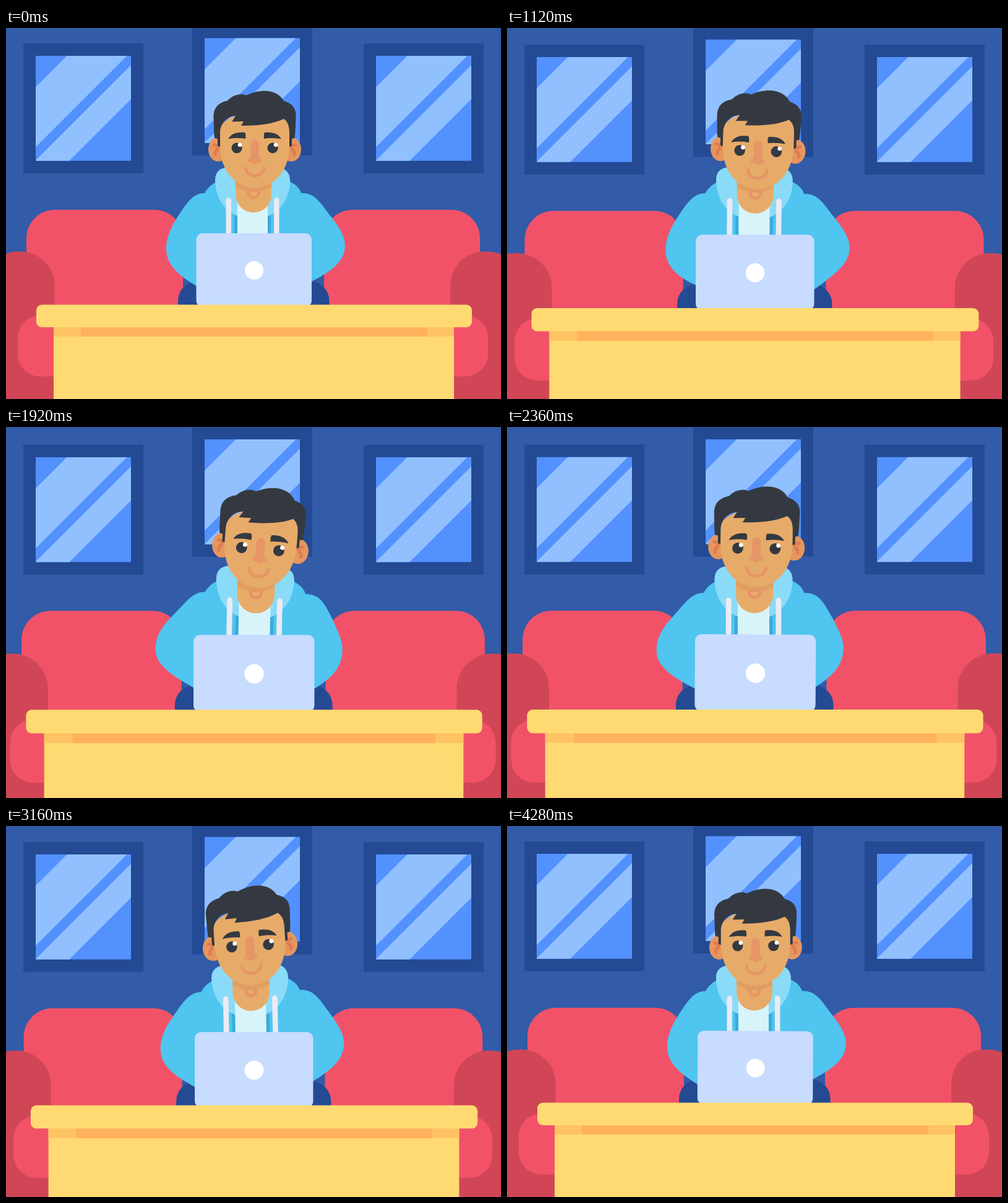
Write an HTML page with a canvas that moves like this. It is 800 px wide and 600 px high and loops after 4.32 s.

```html
<!DOCTYPE html>
<html lang="en">
<head>
<meta charset="utf-8">
<title>Working from the sofa</title>
<style>
  html, body { margin: 0; width: 100%; height: 100%; overflow: hidden; background: #325ba8; }
  canvas { display: block; }
</style>
</head>
<body>
<canvas id="stage" width="800" height="600"></canvas>
<script>
const ctx = document.getElementById('stage').getContext('2d');
const LOOP = 4320, CX = 401, CY = 322;
const C = {
  wall: '#325ba8', navy: '#244a94', glass: '#5391ff', shine: '#91c0ff',
  sofa: '#f25268', sofaDark: '#d04657',
  desk: '#ffda72', deskEdge: '#ffc364', deskShade: '#ffb15d',
  hoodie: '#4fc5f0', hood: '#8adbf8', zip: '#38abdb', shirt: '#d7f4fb', string: '#ebeaf3',
  skin: '#e7ab69', shade: '#e19e62', blush: '#e69566', ear: '#e6965d', earDark: '#de7c52',
  hair: '#343941', laptop: '#c7dcff'
};

// Smooth periodic curves through a few poses.
const TIMES = [0, 640, 1120, 1920, 2720, 3600];
function curve(...v) {
  const n = v.length;
  const time = i => TIMES[(i + n) % n] + LOOP * Math.floor(i / n);
  const val = i => v[(i + n) % n];
  const slope = i => (val(i + 1) - val(i - 1)) / (time(i + 1) - time(i - 1));
  return t => {
    let i = n - 1;
    while (TIMES[i] > t) i--;
    const d = time(i + 1) - time(i), u = (t - time(i)) / d, w = 1 - u;
    return val(i) * (1 + 2 * u) * w * w + val(i + 1) * (3 - 2 * u) * u * u
      + d * u * w * (slope(i) * w - slope(i + 1) * u);
  };
}
const pose = {
  bob:   curve(0, .85, 2.1, 3.8, 2.75, -.4),
  lean:  curve(0, 0, .4, 1.2, -.95, -1.05),
  headX: curve(402, 402, 405.8, 411, 396.5, 395.3),
  headY: curve(196, 197.5, 197, 195.5, 193.5, 194.5),
  tilt:  curve(0, .5, 2, 4.8, -2.4, -3.8),
  nod:   curve(0, .8, 1, 1, .95, 0),
  elbowL: curve(0, 0, 0, -13, -7.5, -1),
  elbowR: curve(0, 0, 1.5, -12, -6.5, 0),
  handL: curve(0, -4, -6, -1, -3, 1),
  handR: curve(0, 8, 9, 4, 5, 0)
};

const rad = deg => deg * Math.PI / 180;

function box(color, x1, y1, x2, y2, r = 0) {
  ctx.fillStyle = color;
  ctx.beginPath();
  ctx.roundRect(x1, y1, x2 - x1, y2 - y1, r);
  ctx.fill();
}
function oval(color, x, y, rx, ry = rx) {
  ctx.fillStyle = color;
  ctx.beginPath();
  ctx.ellipse(x, y, rx, ry, 0, 0, 7);
  ctx.fill();
}
function shape(color, d) {
  ctx.fillStyle = color;
  ctx.fill(new Path2D(d));
}
function line(color, width, d) {
  ctx.strokeStyle = color;
  ctx.lineWidth = width;
  ctx.lineCap = 'round';
  ctx.stroke(new Path2D(d));
}
function group(draw, x = 0, y = 0, scale = 1, angle = 0, px = x, py = y) {
  ctx.save();
  ctx.translate(x, y);
  ctx.rotate(rad(angle));
  ctx.scale(scale, scale);
  ctx.translate(-px, -py);
  draw();
  ctx.restore();
}
// Draws on both sides of the vertical line at x.
function mirrored(x, draw) {
  draw();
  ctx.save();
  ctx.translate(2 * x, 0);
  ctx.scale(-1, 1);
  draw();
  ctx.restore();
}

function pane(x, y) {
  box(C.navy, x, y, x + 194, y + 210);
  ctx.save();
  ctx.translate(x + 20, y + 20);
  ctx.beginPath();
  ctx.rect(0, 0, 154, 169.7);
  ctx.clip();
  box(C.glass, 0, 0, 154, 170);
  for (const [a, b] of [[50.5, 147.5], [169, 224]])
    shape(C.shine, `M${a} 0H${b}L0 ${b}V${a}Z`);
  ctx.restore();
}

function sofaBack() {
  box(C.sofa, 33, 294, 286, 640, 46);
  box(C.sofa, 514, 294, 766, 640, 46);
}

function sofaFront() {
  box(C.sofaDark, -36, 361.5, 78.5, 700, 55);
  box(C.sofaDark, 718, 361.5, 833, 700, 55);
  box(C.sofa, 19, 465, 779, 563.5, 36);
}

function body(t) {
  const l = pose.elbowL(t), r = pose.elbowR(t);
  shape(C.hoodie, `M342 248C332 253 326 258 321 267C301 267 291 285 ${277 + l / 2} 306
    C${264 + l} 326 ${259 + l} 342 ${259 + l} 357C${259 + l} 386 284 403 312 ${420 + pose.handL(t)}
    L400 440V248Z`);
  shape(C.hoodie, `M458 248C468 253 474 258 477 267C500 266 508 283 ${526 + r / 2} 306
    C${540 + r} 324 ${548 + r} 338 ${548 + r} 352C${548 + r} 378 524 395 490 ${412 + pose.handR(t)}
    L399 440V248Z`);
  box(C.zip, 369, 290, 428, 450);
  shape(C.hood, `M338 246C338 234 344 228 354 226H444C454 229 459 236 459 247
    C459 268 449 293 424 304H374C348 293 338 268 338 246Z`);
  box(C.shirt, 374, 270, 423, 450);
  box(C.string, 355.5, 274.5, 364, 400, 4.2);
  box(C.string, 433, 274.5, 441.5, 400, 4.2);
  box(C.skin, 371, 230, 429, 298.5, [0, 0, 29, 29]);
  line(C.blush, 5, 'M391.5 266C392 277 408 277 408.5 266');
  shape(C.shade, 'M371 235H429V257Q400 274 371 257Z');
  line(C.blush, 4, 'M392 265Q400 260 408 265');
}

function head(t) {
  const nod = pose.nod(t);
  mirrored(402, () => {
    oval(C.ear, 343, 196.5, 16, 19.5);
    line(C.earDark, 5, 'M336 189Q345 190 341 197Q337 199 338 205');
  });
  shape(C.skin, 'M346 160V190C346 228 368 258 402 258C436 258 458 228 458 190V150C440 130 366 130 346 160Z');
  shape(C.hair, `M342 189Q342 192 346 192V168C347 153 358 143 371 142L365 151.5L384 151L380 158
    C410 158 432 155 449 147C456 152 458 160 458 170V192Q462 192 462 189V179L466.500 178
    C468 165 468 155 468.500 143C469 130 463 122 449 118C440 101 416 96 388 109
    C379 105 367 108 358 117.500C342 121 335 130 335.500 145C336 160 336 170 337 178L342 179Z`);
  mirrored(402, () => shape(C.hair,
    `M359 ${179.5 + 6 * nod}c5-9 15-12 27-10.500q2 3 1 10c-10-1.500-18-1-28 .5Z`));
  for (const x of [373, 431]) {
    oval(C.hair, x, 194 + 4 * nod, 8.6);
    oval('#fff', x + 5, 189 + 4 * nod, 3.3);
  }
  group(() => {
    box(C.blush, 395, 181, 409, 216, 7);
    shape(C.blush, 'M395 208Q394 210 392 211.500C389 215 392 218 396 217Q402 223 408 217C412 218 415 215 412 211.500Q410 210 409 208Z');
  }, 0, 3 * nod);
  ctx.save();
  ctx.translate(0, 2 * nod);
  line(C.blush, 5, 'M387 226.500C389 243 415 243 417 226.500');
  ctx.restore();
}

function laptop(t) {
  const rock = Math.cos(2 * Math.PI * (t - 600) / 960);
  const tilt = .33 * Math.min(1, Math.max(0, .5 + 1.5 * rock));
  group(() => {
    box(C.laptop, 307.5, 332, 494, 451, 10);
    oval('#fff', 401, 392, 15);
  }, 494, 480, 1, tilt);
}

function desk() {
  box(C.desk, 77, 480, 724, 700);
  box(C.deskEdge, 77, 480, 724, 499);
  box(C.deskShade, 121, 480, 681, 499);
  box(C.desk, 49, 447.5, 753, 484, 9);
}

function draw(t) {
  const zoom = (1 - Math.cos(2 * Math.PI * (t + 30) / LOOP)) / 2;
  const bob = pose.bob(t);
  const layer = (depth, paint) =>
    group(paint, CX, CY + bob, 1 + depth * zoom, 0, CX, CY);

  box(C.wall, 0, 0, 800, 600);
  pane(28, 25 + bob);
  pane(301, -3.7 + bob);
  pane(578, 25 + bob);
  layer(.022, sofaBack);
  layer(.0335, sofaFront);
  layer(.043, () => {
    box(C.navy, 278, 410, 522.5, 480, 31);
    group(() => body(t), CX, 450, 1, pose.lean(t));
  });
  group(() => head(t), pose.headX(t), pose.headY(t), 1 + .042 * zoom, pose.tilt(t), 402, 196);
  layer(.0485, () => {
    laptop(t);
    desk();
  });
}

const start = performance.now();
function tick() {
  draw((performance.now() - start) % LOOP);
  requestAnimationFrame(tick);
}
tick();
</script>
</body>
</html>
```
